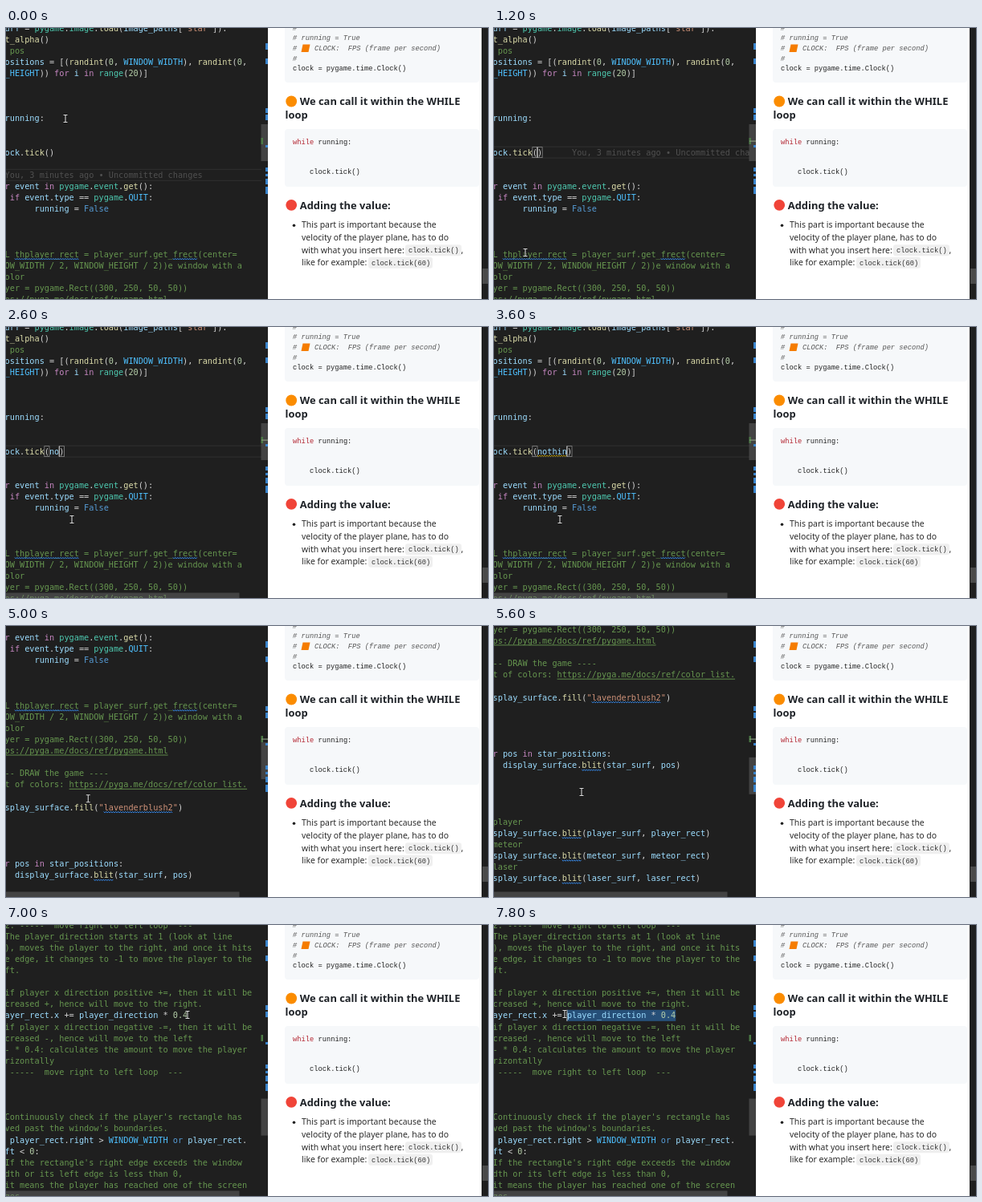
An HTML page with a canvas for the animation above (8000 ms loop, 600 px wide and 338 px high).

```html
<!DOCTYPE html>
<html lang="en">
<head>
<meta charset="utf-8">
<title>Clock tick lesson</title>
<style>
html, body { margin: 0; width: 100%; height: 100%; overflow: hidden; background: #1f1f1f; }
canvas { display: block; width: 600px; height: 338px; }
</style>
</head>
<body>
<canvas id="stage" width="600" height="338"></canvas>
<script>
const ctx = document.getElementById('stage').getContext('2d');
const LOOP = 8000, STEP = 200;
const LINE = 14.1, CHAR = 6.152, LEFT = -1.4, EDGE = 326;
const MONO = '10.22px "DejaVu Sans Mono", monospace';
const NOTE_MONO = '8.72px "Liberation Mono", monospace';
const NOTE_TEXT = '10.46px "Noto Sans", sans-serif';
const NOTE_HEAD = 'bold 12.9px "Noto Sans", sans-serif';

const GREEN = '#66964f', PLAIN = '#d4d4d4';
const TICK_LINE = 11, MOVE_LINE = 58;

// Editor lines: row, text, first column (columns below 0 lie off stage)
const code = [
  [0, "star_surf = pygame.image.load(image_paths['star']).", -6],
  [1, 'convert_alpha()', -6],
  [3, 'star_positions = [(randint(0, WINDOW_WIDTH), randint(0,', -6],
  [4, '_HEIGHT)) for i in range(20)]'],
  [8, 'while running:', -6],
  [14, 'for event in pygame.event.get():', -2],
  [15, 'if event.type == pygame.QUIT:', 1],
  [16, 'running = False', 6],
  [29, 'display_surface.fill("lavenderblush2")', -2],
  [34, 'for pos in star_positions:', -2],
  [35, 'display_surface.blit(star_surf, pos)', 2],
  [41, 'display_surface.blit(player_surf, player_rect)', -2],
  [43, 'display_surface.blit(meteor_surf, meteor_rect)', -2],
  [45, 'display_surface.blit(laser_surf, laser_rect)', -2],
  [58, 'player_rect.x += player_direction * 0.4', -2],
  [69, 'player_rect.right > WINDOW_WIDTH or player_rect.', 1],
  [70, 'left < 0:', -2]
];
const comments = [
  [2, 'pos', 1],
  [20, 'L thplayer_rect = player_surf.get_frect(center='],
  [21, 'OW_WIDTH / 2, WINDOW_HEIGHT / 2))e window with a'],
  [22, 'color', -1],
  [23, 'ayer = pygame.Rect((300, 250, 50, 50))', -1],
  [24, 'https://pyga.me/docs/ref/pygame.html', -3],
  [26, '-- DRAW the game ----'],
  [27, 't of colors: https://pyga.me/docs/ref/color_list.'],
  [40, 'player'], [42, 'meteor'], [44, 'laser'],
  [50, '2. -----  move right to left loop  ---'],
  [51, 'The player_direction starts at 1 (look at line'],
  [52, '), moves the player to the right, and once it hits'],
  [53, 'e edge, it changes to -1 to move the player to the'],
  [54, 'ft.'],
  [56, 'if player x direction positive +=, then it will be'],
  [57, 'creased +, hence will move to the right.'],
  [59, 'if player x direction negative -=, then it will be'],
  [60, 'creased -, hence will move to the left'],
  [61, '- * 0.4: calculates the amount to move the player'],
  [62, 'rizontally'],
  [63, '-----  move right to left loop  ---', 1],
  [67, "Continuously check if the player's rectangle has"],
  [68, "ved past the window's boundaries."],
  [71, "If the rectangle's right edge exceeds the window"],
  [72, 'dth or its left edge is less than 0,'],
  [73, 'it means the player has reached one of the screen'],
  [74, 'ges.']
];
// Spelling marks: row, column, length
const marks = [[20, 2, 13], [20, 34, 5], [29, 20, 14], [35, 18, 4], [41, 14, 4], [43, 14, 4], [45, 14, 4]];
const links = [[24, 0, 33], [27, 13, 36]];

// Keyframes: time, then values
const mousePath = [
  [0, 74, 113], [200, 74, 113], [600, 58, 155], [800, 58, 156], [1200, 39, 280],
  [1400, 42, 276], [2000, 82, 240], [4400, 82, 240], [5200, 109, 207], [5800, 109, 207],
  [6400, 137, 187], [6600, 150, 170], [7000, 226, 112], [7200, 222, 112], [7800, 88, 111]
];
const scrollPath = [[4200, 0], [5600, 320], [6400, 608.8], [6800, 705]];
const keyTimes = [2300, 2500, 2750, 3000, 3200, 3500, 3750];

function at(path, t) {
  if (t <= path[0][0]) return path[0].slice(1);
  for (let i = 1; i < path.length; i++) {
    const a = path[i - 1], b = path[i];
    if (t <= b[0]) {
      const k = (t - a[0]) / (b[0] - a[0]);
      return a.slice(1).map((v, j) => v + (b[j + 1] - v) * k);
    }
  }
  return path[path.length - 1].slice(1);
}

const colX = c => LEFT + c * CHAR;

function rect(color, x, y, w, h) {
  ctx.fillStyle = color;
  ctx.fillRect(x, y, w, h);
}

function roundBox(color, x, y, w, h, r) {
  ctx.fillStyle = color;
  ctx.beginPath();
  ctx.roundRect(x, y, w, h, r);
  ctx.fill();
}

function text(str, x, y, color, font) {
  if (font) ctx.font = font;
  ctx.fillStyle = color;
  ctx.fillText(str, x, y);
}

function disc(color, x, y, r) {
  ctx.fillStyle = color;
  ctx.beginPath();
  ctx.arc(x, y, r, 0, 7);
  ctx.fill();
}

function tokenColor(word, before, after) {
  if (/^['"]/.test(word)) return '#ce9178';
  if (/^(for|in|if|while)$/.test(word)) return '#c586c0';
  if (/^(or|False)$/.test(word)) return '#569cd6';
  if (/^\d/.test(word)) return '#b5cea8';
  if (/^[A-Z_]{3,}$/.test(word)) return '#4fc1ff';
  if (word === 'pygame' || word === 'range' || /pygame\.$/.test(before)) return '#4ec9b0';
  if (/^\w/.test(word)) return after === '(' ? '#dcdcaa' : '#9cdcfe';
  return PLAIN;
}

function codeLine(str, col, y) {
  const tokens = /'[^']*'|"[^"]*"|\d+\.?\d*|\w+|[^\w\s]/g;
  for (let m; (m = tokens.exec(str));) {
    const color = tokenColor(m[0], str.slice(0, m.index), str[tokens.lastIndex]);
    text(m[0], colX(col + m.index), y, color);
  }
}

function squiggle(x, y, w, color) {
  ctx.strokeStyle = color;
  ctx.lineWidth = 0.9;
  ctx.beginPath();
  for (let i = 0; i <= w; i += 1.5) ctx.lineTo(x + i, y + (i / 1.5 % 2 ? 1 : -0.6));
  ctx.stroke();
}

function bracketBox(col, y) {
  ctx.strokeStyle = '#888';
  ctx.lineWidth = 0.8;
  ctx.strokeRect(colX(col), y - 6.5, CHAR, 13);
}

function currentLine(y) {
  rect('#303030', 0, y - 7.5, 318, 1);
  rect('#303030', 0, y + 6.5, 318, 1);
}

function iBeam(x, y) {
  const shape = (color, width) => {
    ctx.strokeStyle = color;
    ctx.lineWidth = width;
    ctx.beginPath();
    ctx.moveTo(x - 2.5, y - 4.5);
    ctx.lineTo(x + 2.5, y - 4.5);
    ctx.moveTo(x, y - 4.5);
    ctx.lineTo(x, y + 4.5);
    ctx.moveTo(x - 2.5, y + 4.5);
    ctx.lineTo(x + 2.5, y + 4.5);
    ctx.stroke();
  };
  shape('#111', 2.4);
  shape('#ddd', 1.1);
}

function blame(col, y) {
  text('You, 3 minutes ago • Uncommitted changes', colX(col), y + 3.6, '#505050');
}

function tickLine(t, y) {
  const typed = 'nothing'.slice(0, keyTimes.filter(k => k <= t).length);
  const focused = t >= 800, end = 9 + typed.length;
  if (focused) currentLine(y);
  codeLine(`clock.tick(${typed})`, -2, y + 3.6);
  if (!focused) return;
  bracketBox(8, y);
  bracketBox(end, y);
  rect('#ccc', colX(end) - 0.5, y - 6.5, 1, 13);
  if (typed.length > 2) squiggle(colX(9), y + 5.5, typed.length * CHAR, '#cca700');
  if (!typed) blame(16, y);
}

function editor(t) {
  const scroll = at(scrollPath, t)[0];
  const rowY = row => row * LINE - scroll;
  ctx.save();
  ctx.beginPath();
  ctx.rect(0, 0, 319, 338);
  ctx.clip();
  ctx.font = MONO;

  if (t < 800) {
    currentLine(rowY(13));
    blame(0, rowY(13));
  }
  if (t >= 7200) {
    const from = 15 + 22 * Math.max(0, (7800 - t) / 600);
    const y = rowY(MOVE_LINE);
    rect('#264f78', colX(from), y - 7, colX(37) - colX(from), LINE);
    rect('#ccc', colX(from) - 0.5, y - 7, 1, LINE);
  }
  for (const [row, str, col = 0] of code) codeLine(str, col, rowY(row) + 3.6);
  for (const [row, str, col = 0] of comments) text(str, colX(col), rowY(row) + 3.6, GREEN);
  tickLine(t, rowY(TICK_LINE));
  for (const [row, col, n] of marks) squiggle(colX(col), rowY(row) + 6, n * CHAR, '#3794ff');
  for (const [row, col, n] of links) rect(GREEN, colX(col), rowY(row) + 5, n * CHAR, 0.9);
  ctx.restore();

  if (t >= 1800) rect('rgba(121,121,121,.4)', 0, 331.5, 290.5, 6.5);
  ruler(t, scroll);
  iBeam(...at(mousePath, t));
}

function ruler(t, scroll) {
  rect('rgba(121,121,121,.4)', 317.5, 120 + scroll * 0.137, 8.5, 46);
  for (const [y, h] of [[19, 8], [38, 7], [100, 6], [108, 7], [146, 3], [174, 5], [182, 3], [188, 7], [198, 9]])
    rect('#3a84cc', 323, y, 3, h);
  rect('#4b7a45', 317.5, 137, 2.5, 8);
  if (t >= 800 && t < 7000) rect('#8a9a80', 318, 140.5, 8, 1.2);
}

function inlineCode(str, x, y, w) {
  roundBox('#efefef', x - 4, y - 10, w, 14, 3);
  text(str, x, y, '#333', NOTE_MONO);
}

function notes() {
  rect('#fff', EDGE, 0, 266, 338);
  roundBox('#f6f8fa', 347, -10, 242, 78, 4);
  roundBox('#f6f8fa', 347, 126, 242, 72, 4);

  const italic = 'italic ' + NOTE_MONO;
  text('#', 357, 2.5, '#555', italic);
  text('# running = True', 357, 15.2, '#555', italic);
  text('#', 357, 28, '#555', italic);
  text('CLOCK:  FPS (frame per second)', 384, 28, '#555', italic);
  text('#', 357, 40.7, '#555', italic);
  ctx.fillStyle = '#f57c00';
  ctx.beginPath();
  [[369.5, 20.5], [378.5, 20.5], [376.5, 30], [367.5, 30]].forEach(p => ctx.lineTo(...p));
  ctx.fill();
  text('clock = pygame.time.Clock()', 357, 53.3, '#222', NOTE_MONO);

  const head = '#1f2328';
  disc('#fb8c00', 355.2, 91.5, 6.9);
  text('We can call it within the WHILE', 365.8, 96.3, head, NOTE_HEAD);
  text('loop', 347.5, 112.6, head);
  text('while', 357, 144.5, '#b3232f', NOTE_MONO);
  text('running:', 388.5, 144.5, '#222');
  text('clock.tick()', 378, 182.3, '#222');

  disc('#f04438', 355.2, 220.8, 6.9);
  text('Adding the value:', 365.8, 225.5, head, NOTE_HEAD);
  disc('#222', 358.5, 246.2, 1.8);
  const ink = '#2b2b2b';
  text('This part is important because the', 368, 249.4, ink, NOTE_TEXT);
  text('velocity of the player plane, has to do', 368, 265, ink);
  text('with what you insert here:', 368, 280.6, ink);
  text(',', 566.5, 280.6, ink);
  text('like for example:', 368, 296.2, ink);
  inlineCode('clock.tick()', 501, 280.2, 70);
  inlineCode('clock.tick(60)', 455, 295.8, 80);

  rect('#1f1f1f', 592, 0, 8, 338);
  rect('#4a4a4a', 593, 300, 7, 19);
}

function draw(now) {
  const t = Math.floor(now % LOOP / STEP) * STEP;
  rect('#1f1f1f', 0, 0, 600, 338);
  editor(t);
  notes();
  requestAnimationFrame(draw);
}
requestAnimationFrame(draw);
</script>
</body>
</html>
```
